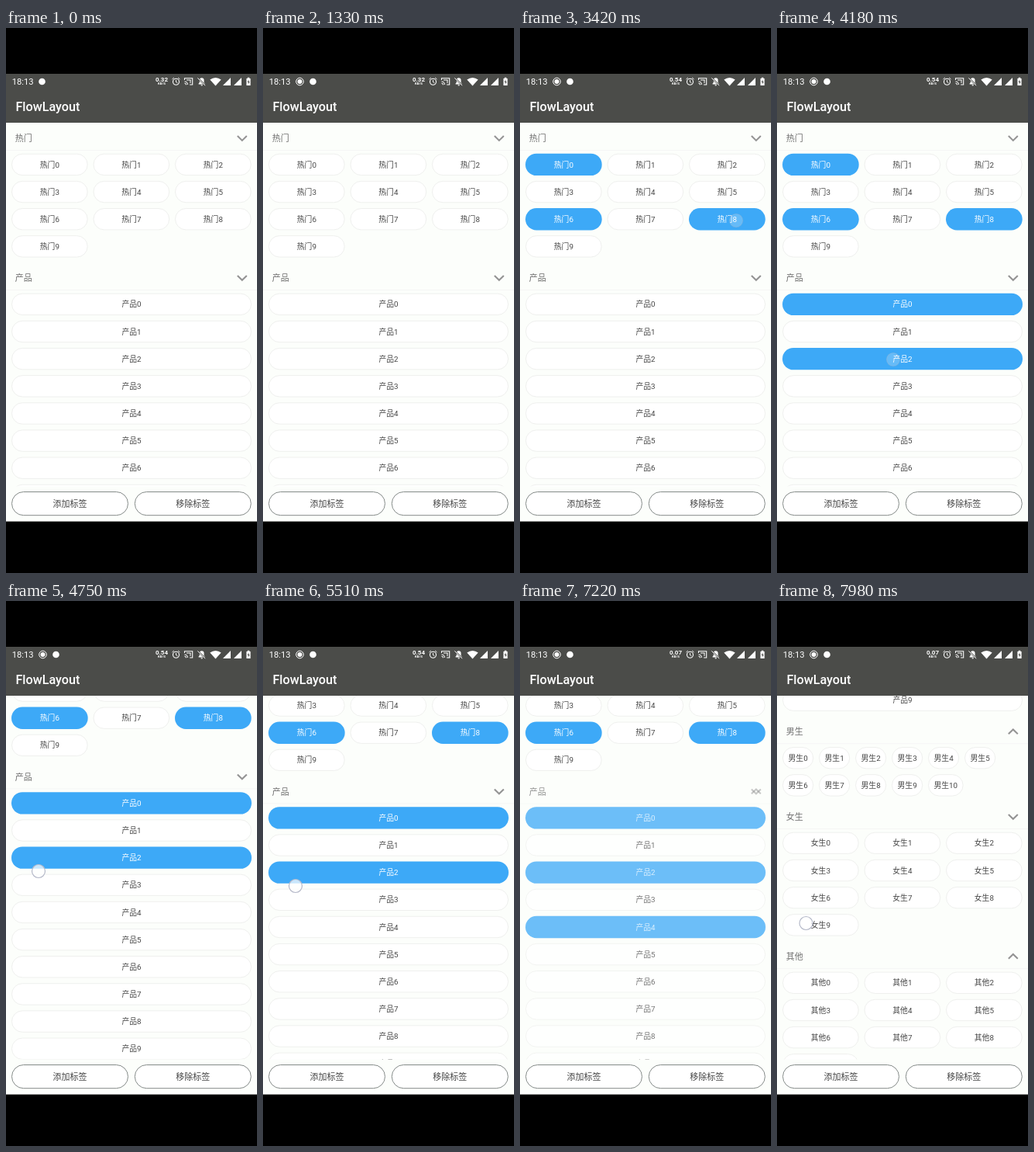
These frames come from a looping animation (324 px wide and 702 px high, 8000 ms). An HTML page with a canvas:

```html
<!DOCTYPE html>
<html lang="zh-CN">
<head>
<meta charset="utf-8">
<title>FlowLayout</title>
<style>
html, body { margin: 0; width: 100%; height: 100%; overflow: hidden; background: #000; }
canvas { display: block; width: 100vw; height: 100vh; }
</style>
</head>
<body>
<canvas></canvas>
<script>
const W = 324, H = 702, LOOP = 8000, STEP = 190;
const FONT = 'Roboto, "Noto Sans CJK SC", "Noto Sans CJK", sans-serif';
const BLUE = '#3da9f7', BAR = '#4b4c49';
const ROW = 35.15, CHIP_H = 28.4;
const canvas = document.querySelector('canvas');
const ctx = canvas.getContext('2d');
const scale = window.devicePixelRatio || 1;
canvas.width = W * scale;
canvas.height = H * scale;

// Zero columns means chips as wide as their label, wrapped.
const sections = [
  { name: '热门', columns: 3, count: 10 },
  { name: '产品', columns: 1, count: 10 },
  { name: '男生', columns: 0, count: 11, up: true },
  { name: '女生', columns: 3, count: 10 },
  { name: '其他', columns: 3, count: 10, up: true }
];
const selectedAt = { 热门0: 1710, 热门6: 2470, 热门8: 3420, 产品0: 3800, 产品2: 4180, 产品4: 5890 };
const taps = [[1710, 57, 177], [2470, 57, 247], [3420, 279, 248], [3800, 150, 357],
  [4180, 150, 427], [5890, 160, 420], [7030, 304, 246]];
const scrollKeys = [[0, 0], [4180, 0], [4750, 95.5], [5130, 95.5], [5510, 76.5], [7410, 76.5], [7980, 544.5]];
const toggle = { start: 7095, length: 250 };

// Place every chip once, in list coordinates.
let headerY = 142;
for (const section of sections) {
  section.y = headerY;
  section.chips = [];
  let x = 7, y = headerY + 33.9;
  for (let i = 0; i < section.count; i++) {
    const w = section.columns === 1 ? 310 : section.columns === 3 ? 98.7 : i > 9 ? 45.6 : 40.2;
    if (x + w > 318) { x = 7; y += ROW; }
    section.chips.push({ label: section.name + i, x, y, w });
    x += w + 6.8;
  }
  headerY = y + 40.6;
}

function interpolate(keys, t) {
  const next = keys.findIndex(k => k[0] > t);
  if (next < 0) return keys[keys.length - 1][1];
  const [t0, a] = keys[next - 1], [t1, b] = keys[next];
  const p = (t - t0) / (t1 - t0);
  return a + (b - a) * p * p * (3 - 2 * p);
}

function text(str, x, y, size, color, align = 'center', weight = 400) {
  ctx.font = `${weight} ${size}px ${FONT}`;
  ctx.fillStyle = color;
  ctx.textAlign = align;
  ctx.fillText(str, x, y + size * 0.37);
}

function rect(x, y, w, h, color) {
  ctx.fillStyle = color;
  ctx.fillRect(x, y, w, h);
}

function pill(x, y, w, h, fill, stroke) {
  ctx.beginPath();
  ctx.roundRect(x, y, w, h, h / 2);
  ctx.fillStyle = fill;
  ctx.fill();
  if (stroke) line(stroke, 1);
}

function line(color, width) {
  ctx.strokeStyle = color;
  ctx.lineWidth = width;
  ctx.stroke();
}

function path(d, color, width) {
  const shape = new Path2D(d);
  if (width) {
    ctx.strokeStyle = color;
    ctx.lineWidth = width;
    ctx.stroke(shape);
  } else {
    ctx.fillStyle = color;
    ctx.fill(shape);
  }
}

function circle(x, y, r) {
  ctx.beginPath();
  ctx.arc(x, y, r, 0, Math.PI * 2);
}

function dot(x, y, r, color) {
  circle(x, y, r);
  ctx.fillStyle = color;
  ctx.fill();
}

function chevron(y, up, alpha) {
  const d = up ? -2.9 : 2.9;
  ctx.globalAlpha = alpha;
  path(`M298.8 ${y - d}L304.8 ${y + d}L310.8 ${y - d}`, '#949494', 2.1);
  ctx.globalAlpha = 1;
}

function drawSection(section, scroll, t) {
  const y = section.y - scroll;
  let turned = section.up ? 1 : 0, alpha = 1;
  if (section.name === '产品') {
    turned = Math.min(1, Math.max(0, (t - toggle.start) / toggle.length));
    alpha = 1 - turned * (1 - turned);
  }
  ctx.globalAlpha = alpha;
  text(section.name, 11.7, y, 11, '#707070', 'left');
  rect(0, y + 15, W, 1, '#f5f6f5');
  for (const chip of section.chips) {
    const cy = chip.y - scroll;
    const on = selectedAt[chip.label] <= t;
    if (on) pill(chip.x, cy - CHIP_H / 2, chip.w, CHIP_H, BLUE);
    else pill(chip.x + 0.5, cy - CHIP_H / 2 + 0.5, chip.w - 1, CHIP_H - 1, '#fff', '#eff0ee');
    text(chip.label, chip.x + chip.w / 2, cy, 9.8, on ? '#fff' : '#444');
  }
  if (turned < 1) chevron(y, false, 1 - turned);
  if (turned > 0) chevron(y, true, turned);
}

function drawStatusBar(t) {
  const white = '#fff', recording = t >= 570;
  text('18:13', 7.7, 69, 11.2, white, 'left');
  if (recording) {
    circle(47.5, 69, 4.8);
    line(white, 1);
    dot(47.5, 69, 3, white);
  }
  dot(recording ? 64.5 : 46.5, 69, 4.3, white);
  text(t < 2850 ? '0.32' : t < 5700 ? '0.54' : '0.07', 201, 65.6, 8, white, 'center', 700);
  text('KB/S', 201, 71.8, 4.4, white, 'center', 700);

  circle(219.5, 69.3, 4);
  line(white, 1.1);
  path('M219.5 67v2.6l1.8 1M214.5 66l2.3-2M222.2 64l2.3 2', white, 1);

  path('M230.5 67v-2.3h10.2v8.3h-3.6M230.5 69a4 4 0 0 1 4 4M230.5 71.3a2 2 0 0 1 2 2', white, 1.1);
  rect(233, 66.5, 5.5, 1, white);
  rect(237.5, 67, 1, 4, white);

  path('M248.6 72.5v-1l1.2-1.3v-3a2.9 2.9 0 0 1 5.8 0v3l1.2 1.3v1zM251.5 73.3h2.4a1.2 1.2 0 0 1-2.4 0z', white);
  path('M248 65l9.5 9', BAR, 2);
  path('M247.4 64.4l9.8 9.6', white, 1);

  path('M263.3 66.6q7.2-5 14.4 0l-7.2 8z', white);
  path('M290 64v10h-10z', white);
  path('M304 64v10h-10z', white);
  path('M310.4 65h1.3v-1.2h2.6v1.2h1.3v9h-5.2z', white);
  path('M313.4 66.4l-1.8 3.3h1.2v2.9l1.8-3.6h-1.2z', BAR);
}

function touch(x, y, alpha) {
  ctx.globalAlpha = alpha;
  dot(x, y, 8.5, 'rgba(255,255,255,.72)');
  line('#b4b8c8', 1.2);
  ctx.globalAlpha = 1;
}

function drawTouches(t, scroll) {
  for (const [time, x, y] of taps) {
    if (t === time || t === time - STEP) touch(x, y, t === time ? 0.3 : 1);
  }
  if (t >= 4370 && t <= 5510) touch(42, 443.5 - scroll, 1);
  if (t >= 7410 && t <= 7600) touch(38, 636.5 - scroll, 1);
  if (t >= 7980) touch(37.5, 415, 1);
}

function button(label, x) {
  pill(x + 0.5, 597.5, 150, 30.2, '#fff', '#858b89');
  text(label, x + 75.5, 612.8, 11, '#444');
}

function draw(t) {
  const scroll = interpolate(scrollKeys, t);
  ctx.setTransform(scale, 0, 0, scale, 0, 0);
  rect(0, 0, W, H, '#000');
  rect(0, 59, W, 576.6, '#fcfefb');

  ctx.save();
  ctx.beginPath();
  ctx.rect(0, 122, W, 468.5);
  ctx.clip();
  for (const section of sections) drawSection(section, scroll, t);
  ctx.restore();

  button('添加标签', 7);
  button('移除标签', 165.8);
  rect(0, 59, W, 63, BAR);
  drawStatusBar(t);
  text('FlowLayout', 12.4, 101, 16.2, '#fff', 'left', 500);
  drawTouches(t, scroll);
}

function frame() {
  const t = performance.now() % LOOP;
  draw(Math.floor(t / STEP) * STEP);
  requestAnimationFrame(frame);
}
frame();
</script>
</body>
</html>
```
